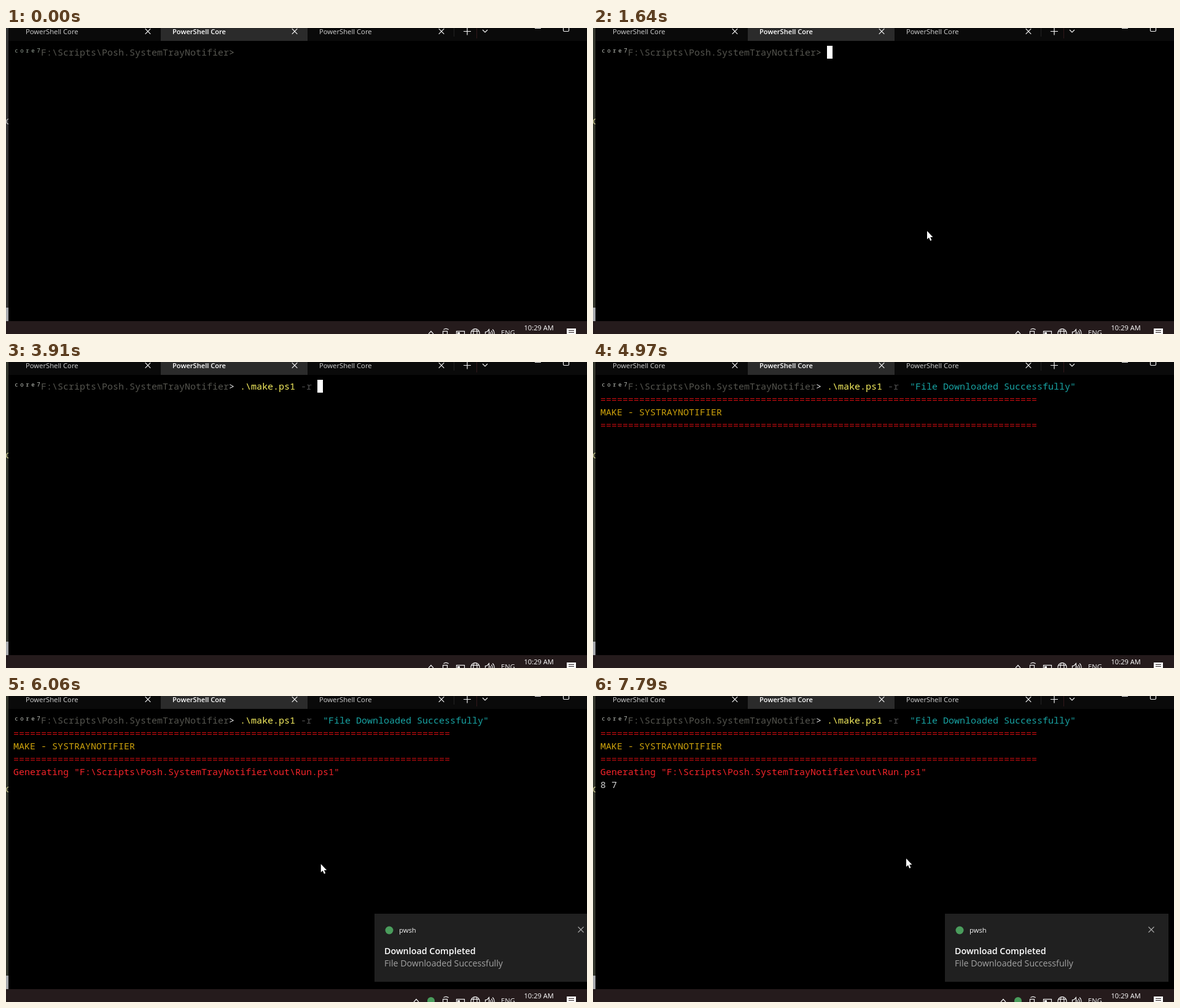
An HTML page with a canvas that plays this animation: 946x499 px, repeating every 8 s.

```html
<!DOCTYPE html>
<html>
<head>
<meta charset="utf-8">
<style>
html, body { margin: 0; width: 100%; height: 100%; overflow: hidden; background: #000; }
canvas { display: block; }
</style>
</head>
<body>
<canvas id="stage" width="946" height="499"></canvas>
<script>
const c = document.getElementById('stage').getContext('2d');
const LOOP = 8000, CELL = 9, ROW = 21, LEFT = 12, TOP = 29;
const CLICK = 1500, TYPING = 2400, ENTER = 4910, RUN = 5030, BEAT = 1070;
const WHITE = '#f4f4f4', GREEN = '#4a9c5c', RED = '#c80c10';
const PROMPT = 'F:\\Scripts\\Posh.SystemTrayNotifier';
const SCRIPT = '.\\make.ps1';
const MESSAGE = 'File Downloaded Successfully';

const mono = size => `${size}px "Noto Sans Mono", monospace`;
const ui = (size, weight = 400) => `${weight} ${size}px "Open Sans", sans-serif`;
const mix = (a, b, u) => a + (b - a) * Math.max(0, Math.min(1, u));
const typed = (s, t, start, step) => s.slice(0, Math.max(0, Math.floor((t - start) / step) + 1));

function rect(x, y, w, h, color) {
  c.fillStyle = color;
  c.fillRect(x, y, w, h);
}
function text(s, x, y, font, color) {
  c.font = font;
  c.fillStyle = color;
  c.fillText(s, x, y);
}
function cells(s, col, row, color) {
  text(s, LEFT + col * CELL, TOP + 16 + row * ROW, mono(15), color);
}
function disc(x, y, r, color) {
  c.fillStyle = color;
  c.beginPath();
  c.arc(x, y, r, 0, 7);
  c.fill();
}
function pen(color, width = 1.2) {
  c.strokeStyle = color;
  c.lineWidth = width;
}
const stroke = path => c.stroke(new Path2D(path));
const cross = (x, y, r) => stroke(`M${x - r} ${y - r}l${2 * r} ${2 * r}m0 ${-2 * r}l${-2 * r} ${2 * r}`);
const chevron = (x, y, r) => stroke(`M${x - 4} ${y - r}l4 ${r}l4 ${-r}`);
function arc(x, y, rx, ry, from = 0, to = 7) {
  c.beginPath();
  c.ellipse(x, y, rx, ry, 0, from, to);
  c.stroke();
}

function windowFrame(focused) {
  rect(0, 0, 4, 478, focused ? '#33352c' : '#343434');
  text('C', -.5, 157, ui(12), focused ? '#e6e2a0' : '#dcdcdc');
  rect(0, 456, 4, 22, '#a6a8ac');
  rect(4, 0, 942, 478, '#000');
  rect(4, 0, 942, 21, '#0a0a0a');
  rect(252, 0, 239, 21, '#2b2b2b');
  pen(WHITE);
  for (let i = 0; i < 3; i++) {
    const x = 32 + i * 239, active = i === 1;
    text('PowerShell Core', x, 10, active ? ui(11.1, 600) : ui(11.25), active ? '#fff' : '#d4d4d4');
    cross(x + 199, 5.5, 4.3);
  }
  stroke('M745 5.5h12m-6 -6v12');
  chevron(780, 7, 4);
  rect(729, 0, 1, 14, '#242424');
  rect(766, 0, 1, 17, '#32181b');
  rect(861, 0, 10, 1, WHITE);
  c.beginPath();
  c.roundRect(907.5, -4, 9, 9.5, 1.5);
  c.stroke();
}

function taskbar(t) {
  const notified = t >= 5230;
  rect(0, 478, 946, 21, '#251b1c');
  pen(WHITE);
  chevron(notified ? 668 : 692, 494.5, -4.5);
  if (notified) disc(692, 497, 6, GREEN);

  c.strokeRect(711.5, 494.5, 7, 9);              // camera
  arc(716.5, 494, 5, 3.5, -2.5, -.6);
  c.strokeRect(733.5, 494.5, 13, 8);             // battery
  rect(735, 496, 4, 3, WHITE);
  for (const rx of [7, 3]) arc(764, 497.5, rx, 7); // globe
  stroke('M758 494.5h12');
  stroke('M780.5 499v-3.5h2.5l3.5 -4v8');         // speaker
  for (const r of [3, 6, 9]) arc(786, 498, r, r, -.8, .3);
  text('ENG', 806, 501, ui(11.25), WHITE);
  text('10:29 AM', 843.5, 492.5, ui(11.1), '#fff');
  rect(913, 490, 15, 9, '#fff');
  for (const y of [493, 496]) rect(916, y, 9, 1, '#251b1c');

  if (t >= 1300 && t < 1380) {
    rect(861, 477, 42, 22, 'rgba(205,205,205,.78)');
    text('Pause', 866, 496, ui(11), '#333');
  }
}

function command(t) {
  if (t < 2630) return typed('./m', t, TYPING, 80);
  const quoted = t >= 4390 ? `"${MESSAGE}"` : '';
  return SCRIPT + typed(' -r', t, 3180, 160) + typed('  ', t, 3910, 400) + quoted;
}

function terminal(t) {
  const cmd = command(t), running = t >= RUN;
  const count = typed('87', t, RUN + BEAT, BEAT).replace(/./g, '$& ');
  [...'core7'].forEach((ch, i) =>
    text(ch, LEFT + 2.2 + i * CELL, 40, mono(9), t < CLICK ? '#9aa69a' : '#c4c8c0'));
  cells(PROMPT, 5, 0, '#55554f');
  cells('>', 39, 0, t < TYPING ? '#66665f' : '#e6e6e6');
  cells(cmd.slice(0, 10), 41, 0, '#f8f060');
  cells(cmd.slice(10, 14), 51, 0, '#505050');
  cells(cmd.slice(14), 55, 0, '#18a4a4');

  if (t >= 4970) {
    for (const row of [1, 3]) cells('='.repeat(79), 0, row, RED);
    cells('MAKE - SYSTRAYNOTIFIER', 0, 2, '#cda20c');
  }
  if (running) cells(`Generating "${PROMPT}\\out\\Run.ps1"`, 0, 4, '#f6242a');
  cells(count, 0, 5, '#d4d4d4');

  const caret = running ? (t - RUN) % BEAT < BEAT / 2
    : t >= TYPING ? t < ENTER : t >= CLICK && t < 2030;
  const col = running ? count.length : 41 + cmd.length;
  if (caret) rect(LEFT + col * CELL, TOP + (running ? 5 * ROW : 0), CELL, ROW, '#fff');
}

function toast(t) {
  if (t < 5840) return;
  const left = 1 - Math.min(1, (t - 5827) / 573);
  const x = Math.round(573 + 373 * left ** 5);
  rect(x, 355, 364, 111, '#202020');
  disc(x + 24, 382, 6.5, GREEN);
  text('pwsh', x + 40, 386, ui(11.25), WHITE);
  pen('#a8a8a8');
  cross(x + 336, 381, 4.5);
  text('Download Completed', x + 16, 421, ui(14.3, 600), '#fff');
  text(MESSAGE, x + 16, 441, ui(14.2), '#a4a4a4');
}

// Glides between two points, then rests until it hides.
function pointer(t, start, end, hide, [x0, y0], [x1, y1]) {
  if (t < start || t >= hide) return;
  const u = (t - start) / (end - start);
  c.save();
  c.translate(mix(x0, x1, u), mix(y0, y1, u));
  const arrow = new Path2D('M0 0v13.5l3 -2.7l2.2 5.2l2.2 -1l-2.2 -5h4.2z');
  pen('#000', 1.5);
  c.stroke(arrow);
  c.fillStyle = '#fff';
  c.fill(arrow);
  c.restore();
}

function pointers(t) {
  const entry = [672, 497], middle = [544, 331], rest = [520, 286], last = [510, 265];
  pointer(t, 1300, 1640, 2030, entry, middle);
  pointer(t, 2030, 2320, TYPING, middle, rest);
  pointer(t, 3180, 3340, 3340, rest, last);
  pointer(t, 5910, 6390, LOOP, [514, 278], last);
}

const start = performance.now();
function draw(now) {
  const t = Math.max(0, now - start) % LOOP;
  windowFrame(t >= CLICK);
  terminal(t);
  taskbar(t);
  toast(t);
  pointers(t);
  requestAnimationFrame(draw);
}
draw(start);
</script>
</body>
</html>
```
